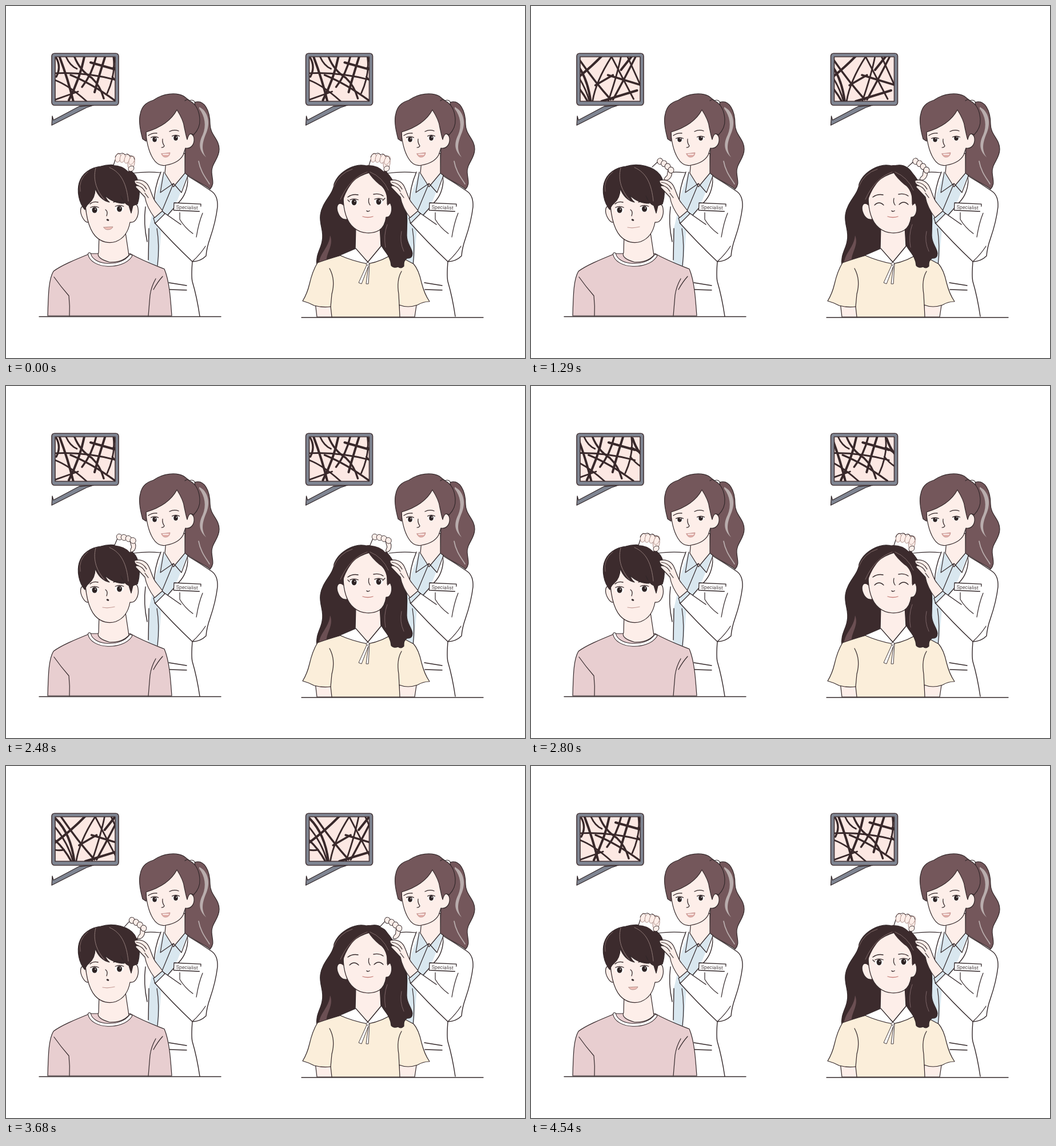
Recreate the animation shown at these times as an HTML page with a canvas. Size 908 by 617 pixels, loop 4580 ms.

```html
<!DOCTYPE html>
<html lang="en">
<head>
<meta charset="utf-8">
<title>Scalp check</title>
<style>
html, body { margin: 0; width: 100%; height: 100%; overflow: hidden; background: #fff; }
canvas { display: block; }
</style>
</head>
<body>
<canvas id="stage" width="908" height="617"></canvas>
<script>
const ctx = document.getElementById('stage').getContext('2d');
const LOOP = 4580;
const INK = '#33282a', SKIN = '#fdeee9', BROWN = '#74575b', DARK = '#3c2b2d';
const BLUE = '#d9e7ef', PINK = '#e8ced0', CREAM = '#fbeeda', GREY = '#7f8592';

// Each track is a list of [time, value] points, joined linearly.
const tracks = {
  slide: [[410, 0], [530, 6], [650, 15], [770, 21], [890, 24], [1290, 24], [1450, 12], [1610, 2],
    [2480, 2], [2560, 0], [2800, 0], [3040, 8], [3240, 22], [3560, 24], [3600, 24], [3880, 9],
    [4080, 2], [4460, 2], [4540, 0]],
  pan: [[410, 0], [650, 100], [890, 150], [1290, 150], [1610, 0], [2480, 0], [2800, 12],
    [3040, 65], [3240, 140], [3560, 150], [3600, 150], [3880, 96], [4080, 0]],
  doctorEyes: [[410, 1], [530, .8], [970, .8], [1010, .4], [1050, .1], [1130, .8], [1290, .8],
    [1410, 1], [2480, 1], [2640, .8], [3080, .8], [3240, .5], [3400, .5], [3560, 1]],
  manEyes: [[970, 1], [1010, .5], [1050, .1], [1130, 1], [3120, 1], [3240, .8], [3400, .8], [3520, 1]],
  womanEyes: [[410, 1], [530, .1], [1370, .1], [1450, .5], [1530, 1], [2480, 1], [2600, .1],
    [3760, .1], [3840, .5], [3900, .55], [4020, 1]]
};

function at(points, t) {
  const next = points.findIndex(p => p[0] > t);
  if (next === 0) return points[0][1];
  if (next < 0) return points[points.length - 1][1];
  const [t0, v0] = points[next - 1], [t1, v1] = points[next];
  return v0 + (v1 - v0) * (t - t0) / (t1 - t0);
}

const between = (t, a, b) => t >= a && t < b;

function shape(d, fill, stroke = INK, width = 1.2) {
  const path = new Path2D(d);
  if (fill) { ctx.fillStyle = fill; ctx.fill(path); }
  if (stroke) { ctx.strokeStyle = stroke; ctx.lineWidth = width; ctx.stroke(path); }
}

const line = (d, color = INK, width = 1.2) => shape(d, null, color, width);

function oval(x, y, rx, ry, fill, angle = 0, stroke = null) {
  ctx.beginPath();
  ctx.ellipse(x, y, rx, ry, angle, 0, Math.PI * 2);
  ctx.fillStyle = fill;
  ctx.fill();
  if (stroke) { ctx.strokeStyle = stroke; ctx.lineWidth = .9; ctx.stroke(); }
}

function shifted(dx, draw) {
  ctx.save();
  ctx.translate(dx, 0);
  draw();
  ctx.restore();
}

function eye(x, y, r, open, curve = -2) {
  if (open < .25) {
    line(`M${x - 8} ${y + 5}Q${x} ${y + 5 - curve * 2} ${x + 8} ${y + 5}`);
    return;
  }
  const lid = y - r * (2 * open - 1);
  ctx.save();
  ctx.beginPath();
  ctx.rect(x - r * 2, lid, r * 4, r * 4);
  ctx.clip();
  oval(x, y, r * 1.45, r, '#fff');
  oval(x, y, r * .85, r, '#2d2324');
  oval(x + 1.4, y - 1.6, .9, .9, '#fff');
  ctx.restore();
  line(`M${x - r - 2} ${lid + 1}Q${x} ${lid - 2.5} ${x + r + 2} ${lid + 1}`);
}

// Groups of hairs on one long strip of scalp, each with its own offset.
const scalp = [
  { x: 0, hairs: [
    'M84 118Q138 115 194 130', 'M88 91Q97 107 88 124', 'M94 90Q109 130 118 168',
    'M105 89Q112 105 124 110', 'M119 87Q128 112 150 126Q165 140 171 162',
    'M137 89Q130 125 110 165', 'M86 130Q110 139 141 167', 'M158 88Q151 119 133 142',
    'M173 90Q161 128 155 151', 'M188 90Q192 120 177 153', 'M113 121Q150 136 191 166',
    'M148 99L194 112', 'M84 165L126 150'] },
  { x: 100, hairs: [
    'M104 90Q140 124 152 168', 'M88 108Q128 128 149 168', 'M121 92Q148 119 154 168',
    'M191 88Q163 131 157 168', 'M130 88Q160 132 189 164', 'M118 136Q150 112 173 88',
    'M86 124Q108 152 136 147', 'M162 139L193 121', 'M90 92Q96 110 105 120'] },
  { x: 140, hairs: [
    'M150 88L189 163', 'M153 164Q176 122 192 90', 'M133 167L195 148',
    'M167 88Q161 119 145 166', 'M144 121L200 138', 'M186 88L167 112', 'M178 88L206 150'] }
];

function monitor(pan) {
  shape('M81 193L83 200L128 176L153 174L141 178L80 209Z', GREY, INK, 1.3);
  ctx.beginPath();
  ctx.roundRect(80, 83, 117, 91, 5);
  ctx.fillStyle = GREY;
  ctx.fill();
  ctx.strokeStyle = '#493a3d';
  ctx.lineWidth = 1.7;
  ctx.stroke();
  ctx.save();
  ctx.beginPath();
  ctx.rect(86, 89, 105, 78);
  ctx.fillStyle = '#fce8e3';
  ctx.fill();
  ctx.stroke();
  ctx.clip();
  ctx.translate(-pan, 0);
  for (const { x, hairs } of scalp)
    shifted(x, () => hairs.forEach((d, i) => line(d, '#38282a', 2.8 + (i % 3) * .6)));
  ctx.restore();
}

function doctorBack(pose) {
  shape('M330 169C347 163 357 184 357 207C357 226 373 233 373 251C373 268 359 276 360 292C361 306 365 312 357 321C346 312 325 304 312 292L314 250L318 220C330 205 334 190 330 169Z', BROWN);
  shape('M338 177C353 184 358 203 351 221C343 240 341 252 350 265C340 256 335 244 344 226C351 210 348 193 338 180Z', '#b9adad', null);
  line('M337 272C340 290 350 302 356 312', '#b9adad', 1.7);

  // coat and shirt
  shape('M270 291L318 297L360 324L328 450Q322 490 339 544H250L243 380Z', '#fff', null);
  line(`M${222 + pose.slide * .8} 293Q245 290 270 292`);
  shape('M276 292L262 330L259 350L250 390L249 460H266L272 390L300 340L317 298L312 292L294 316Z', BLUE, null);
  shape('M280 270L278 293L293 317L313 293V258Z', SKIN);
  line('M276 291L270 327L293 311L307 327L318 298M293 311L273 359M264 390Q269 420 265 455');
  line('M271 291Q259 319 259 347M244 352Q240 382 247 413M250 390L249 445', INK, 1.4);
  line('M318 297Q319 324 306 340L278 372', INK, 1.4);
  line('M326 448Q324 474 326 483Q334 510 339 544M285 485L316 490M286 497L316 498', INK, 1.4);

  // face
  shape('M244 212C245 236 249 254 257 267C263 277 271 281 280 279C292 277 304 272 310 261L314 249C324 251 330 242 329 232C328 225 322 222 319 225L318 190L298 172L260 190Z', SKIN);
  shape('M245 237L239 233C234 215 232 199 235 189C237 177 244 169 258 165C275 153 297 151 311 158L321 166C333 172 338 184 339 198C340 211 334 220 328 226C322 221 319 226 317 234C315 228 314 222 312 213C311 202 306 193 299 182C288 203 268 214 245 221Q246 229 245 237Z', BROWN);
  line('M313 166Q318 162 321 166Q327 163 331 169');
  line('M249 227Q256 222 264 223M286 220Q294 216 302 219', INK, 1.3);
  line('M274 233Q273 240 277 245Q276 248 272 248');
  eye(260, 234, 4.4, pose.doctorEyes);
  eye(297, 231.5, 4.4, pose.doctorEyes);
  shape('M272 259Q280 258 287 257Q286 265 279 265Q274 265 272 259Z', '#e3b0aa', '#b98582', .8);
  line('M275 260L284 260', '#fff', 1.6);
}

function scanner({ slide, curled }) {
  ctx.save();
  ctx.translate(206 + slide, 275 + slide * .48);
  ctx.rotate(slide * .019);
  const pale = '#a98883';
  if (curled) {
    shape('M-15 -7L-18 4Q0 5 9 15L14 13L16 -3L8 -13Z', '#fff', null);
    line('M-13 -9L-18 4');
    shape('M8 -7Q20 -5 19 6Q18 14 11 15Q9 12 12 6Z', SKIN, INK, 1);
    for (let i = 0; i < 4; i++) oval(-10 + i * 8, -11 + i * i * .6, 5, 5.4, SKIN, -.6, INK);
  } else {
    shape('M-15 -5L-18 4Q-3 4 8 15L11 8L7 -9Z', '#fff', null);
    line('M-14 -8L-18 4');
    shape('M6 -11Q17 -14 19 -5Q20 4 15 10L8 8Z', SKIN, pale, 1);
    for (let i = 0; i < 4; i++) oval(-10 + i * 8, -9 + i * i * .5, 4.5, 8, SKIN, .2 + i * .08, pale);
    line('M-15 -10Q-12 -18 -6 -16Q-1 -19 2 -14Q8 -18 10 -12Q17 -14 19 -6', INK, 1);
    oval(13, 10, 5.4, 4.4, SKIN, -.7, INK);
  }
  ctx.restore();
}

function doctorFront(pose) {
  scanner(pose);
  shape('M318 298Q340 311 360 325Q371 333 370 352Q367 378 357 407Q351 424 350 438Q340 448 326 448Q292 416 260 380L275 361L304 384L322 345Z', '#fff', null);
  line('M318 298Q340 311 360 325Q371 333 370 352Q367 378 357 407Q351 424 350 438Q340 448 326 448Q292 416 260 380L276 362L306 383', INK, 1.4);
  line('M344 363Q337 380 333 405M327 447Q340 435 349 421M304 362V374Q313 389 327 399');
  shape('M258 372L273 359L278 364L261 381Z', BLUE);
  shape('M225 306C233 303 244 306 249 315C254 324 257 339 263 345L274 359L260 371C253 362 246 351 243 335L228 319C225 316 228 314 232 315C226 313 224 309 225 306Z', SKIN);
  line('M228 309Q240 310 246 321M230 315Q238 316 243 325M243 328L249 336');

  // name badge
  ctx.save();
  ctx.translate(294, 345);
  ctx.rotate(.045);
  ctx.fillStyle = '#fff';
  ctx.fillRect(0, 0, 47, 13);
  line('M0 0H47V4M0 0V13H45', INK, 1.3);
  ctx.fillStyle = '#4a4042';
  ctx.font = '8.8px Roboto, Arial, sans-serif';
  ctx.fillText('Specialist', 4, 10);
  ctx.restore();
}

function man(pose) {
  shape('M73 543C74 510 74 480 83 465C96 455 120 445 147 434H217C240 447 262 455 277 461C286 482 288 515 290 543Z', PINK);
  line('M84 475Q96 492 110 508Q112 526 111 543M262 478Q254 492 252 507L249 543M274 474Q265 484 258 497');
  shape('M163 398L162 432Q157 442 181 449Q203 450 215 437L209 397Z', SKIN);
  line('M146 435C151 458 202 461 218 438', INK, 6);
  line('M146 435C151 458 202 461 218 438', '#fff', 4);

  shape('M139 353C130 346 128 360 134 371Q139 380 144 379Z', SKIN);
  shape('M138 325C138 355 142 387 156 403C166 414 180 417 192 413C205 408 214 396 217 379C227 381 233 367 231 355C230 347 226 347 222 350V320L150 308Z', SKIN);
  shape('M138 357C127 345 124 324 128 310C133 293 148 283 166 281C189 274 215 282 226 296C235 309 235 333 230 347L222 350L219 363L215 350Q206 346 201 333Q206 341 207 346Q188 346 173 332Q176 340 181 344Q164 340 156 320Q156 337 145 346Q140 350 138 357Z', DARK);
  line('M157 284C151 305 160 326 172 339M181 283C202 292 211 312 214 342', '#9a8582', .9);
  line('M130 325Q126 305 143 291', '#8d7774', .8);
  line('M147 347Q153 342 161 344M188 344Q196 340 205 345', INK, 1.3);
  eye(155, 357.5, 5.3, pose.manEyes);
  eye(198.5, 355.5, 5.3, pose.manEyes);
  line('M174 357Q179 360 176 368');
  oval(178, 375, 2.4, 1.5, INK, .3);
  if (pose.smiling) shape('M171 388Q180 387 187 387Q185 392 178 392Q173 392 171 388Z', '#f0c0b8', '#a9857f', .9);
  else line('M169 388Q178 390 190 387', '#c39a94', 1.2);
}

function woman(pose) {
  shape('M633 281C612 273 582 290 574 312C573 330 553 343 550 366C548 384 557 395 553 412C551 426 541 436 544 456H690L700 410C701 390 704 367 698 347C690 329 680 308 668 294Q655 273 633 281Z', DARK, INK);
  shape('M567 402C574 420 559 434 561 448L547 453C549 432 565 424 567 402Z', '#6b4f53', null);

  // dress
  shape('M541 520L544 545H571V520ZM688 520V545H715L719 518Z', SKIN);
  shape('M586 437Q562 444 545 450Q536 465 531 487Q527 504 519 517Q530 520 539 525Q554 529 568 527L570 545H689L688 524Q703 530 720 524Q730 518 741 518Q732 505 727 485Q722 462 713 452L677 433Z', CREAM);
  line('M566 460Q577 480 570 505L568 527M692 465Q683 480 687 505L688 524');
  shape('M612 386L611 426L633 449L656 421L654 386Z', SKIN);
  shape('M612 425L584 437Q606 447 633 452Q660 447 678 433L657 420L633 449Z', '#fff');
  shape('M632 452L617 485L622 487L634 456L630 487L634 487L636 452Z', '#fff', INK, .9);
  oval(633, 452, 3, 2.3, '#fff', 0, INK);

  // front locks and face
  shape('M670 330C659 355 667 383 657 408C651 426 672 430 674 455Q678 460 686 457Q691 461 696 456Q695 446 702 442Q711 443 711 433C709 422 701 416 701 402Q703 365 690 329Z', DARK, INK);
  line('M667 383Q660 402 664 423M692 395Q688 413 696 430', '#8c7476', .8);
  shape('M592 349C582 342 577 349 580 360Q585 376 597 374Z', SKIN);
  shape('M590 334C590 358 596 379 609 389C622 400 641 400 653 393Q663 386 665 370C674 371 677 356 673 347Q669 342 667 347L667 325Q650 307 636 292Q600 302 590 334Z', SKIN);
  shape('M634 292C614 295 599 315 591 337Q587 345 592 351Q584 346 584 340L574 320Q590 284 633 279Q661 278 674 302L690 336L673 345L667 350Q668 322 653 313Q640 302 634 292Z', DARK, null);
  line('M632 291Q602 301 585 339M637 291Q659 300 669 323M573 317Q583 293 606 286', '#927a79', .8);
  line('M598 335Q606 329 616 331M643 330Q653 328 660 333', INK, 1.3);
  eye(609, 344, 5.2, pose.womanEyes, 4);
  eye(652, 343, 5.2, pose.womanEyes, 4);
  if (pose.womanEyes > .4) line('M601 343L598 340M659 341L663 337', INK, 1.3);
  line('M635 337Q633 344 637 349');
  line('M631 359Q633 361 636 359', INK, 1.5);
  line('M624 369Q633 372 642 369', '#c77f79', 1.3);
}

function render(t) {
  const pose = {
    curled: between(t, 1290, 2520) || between(t, 3600, 4500),
    smiling: t < 530 || t >= 3800
  };
  for (const name in tracks) pose[name] = at(tracks[name], t);

  ctx.fillStyle = '#fff';
  ctx.fillRect(0, 0, 908, 617);
  ctx.lineCap = ctx.lineJoin = 'round';
  monitor(pose.pan);
  shifted(444.5, () => monitor(pose.pan));
  doctorBack(pose);
  man(pose);
  doctorFront(pose);
  shifted(447, () => doctorBack(pose));
  woman(pose);
  shifted(447, () => doctorFront(pose));
  line('M58 544.5H376M517 546H835', INK, 1.3);
}

const start = performance.now();
function tick() {
  render((performance.now() - start) % LOOP);
  requestAnimationFrame(tick);
}
tick();
</script>
</body>
</html>
```
